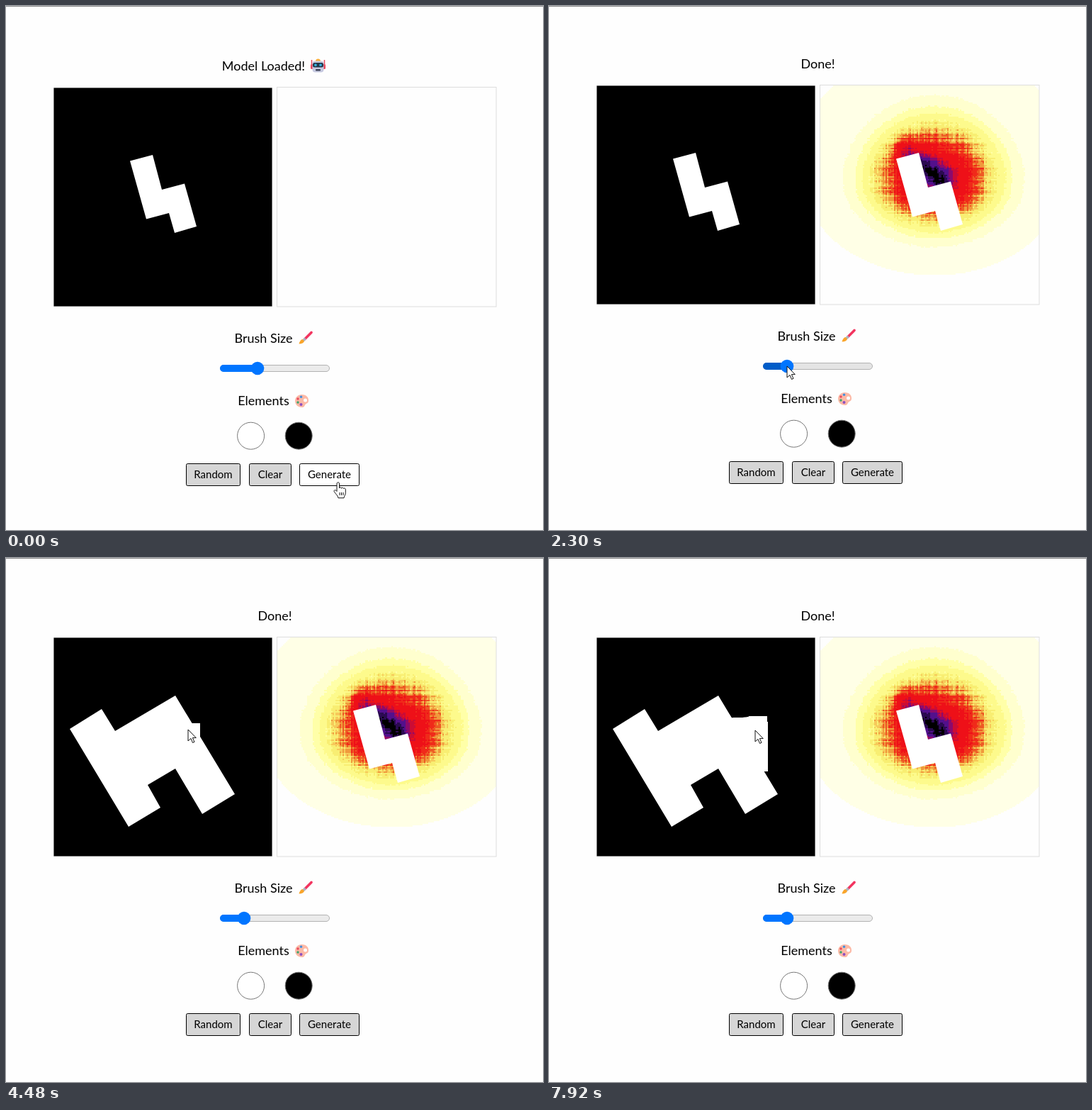
Recreate the animation shown at these times as an HTML page with a canvas. Size 758 by 739 pixels, loop 8000 ms.

```html
<!DOCTYPE html>
<html lang="en">
<head>
<meta charset="utf-8">
<title>Sketch generator</title>
<style>
  html, body { margin: 0; width: 100%; height: 100%; overflow: hidden; background: #fefefe; }
  svg { position: absolute; left: 0; top: 0; }
  text { font: 18px Lato, "Open Sans", sans-serif; text-anchor: middle; }
  .button rect { fill: #d6d6d6; stroke: #000; }
  .button text { font-size: 15px; }
  .button.hover rect { fill: #fff; }
</style>
</head>
<body>
<svg width="758" height="739" viewBox="0 0 758 739">
  <path d="M0 .5H758" stroke="#8c8c8c"/>
  <g id="page">
    <text id="title" y="88"></text>
    <g id="robot" transform="translate(430 71)">
      <path d="M1.5 2V9M19.5 2V9" stroke="#e8475c" stroke-width="1.5"/>
      <path d="M7 4a3.5 3.5 0 0 1 7 0z" fill="#fbb03b"/>
      <rect y="8" width="21" height="7" rx="1.5" fill="#e8475c"/>
      <rect x="2.5" y="3.5" width="16" height="16" rx="4" fill="#c6c9e0"/>
      <rect x="3" y="6" width="15" height="6.5" rx="2.5" fill="#26384a"/>
      <circle cx="7" cy="9.2" r="1.8" fill="#35b5e5"/>
      <circle cx="14" cy="9.2" r="1.8" fill="#35b5e5"/>
      <rect x="7" y="15" width="7" height="2.5" rx="1" fill="#3d4257"/>
    </g>

    <rect x="67" y="112" width="309" height="309" fill="#ddd"/>
    <rect x="67.5" y="112.5" width="308" height="308"/>
    <path id="sketch" fill="#fff"/>
    <path id="paint" fill="#fff"/>

    <rect x="382.5" y="111.5" width="309.500" height="309.500" fill="#fefefe"/>
    <g id="result">
      <foreignObject x="383" y="112" width="309" height="309">
        <canvas id="heat" width="155" height="155" style="display:block;width:309px;height:309px;image-rendering:pixelated"></canvas>
      </foreignObject>
      <path id="cutout" fill="#fff" transform="translate(315 0)"/>
    </g>
    <rect x="382.500" y="111.500" width="309.500" height="309.500" fill="none" stroke="#ddd"/>

    <text x="363.500" y="471.500">Brush Size</text>
    <g stroke-linecap="round">
      <path d="M431 457.500L422 466.500" stroke="#f2345f" stroke-width="3.600"/>
      <path d="M421.500 467L420 468.500" stroke="#a9b4c0" stroke-width="3.600"/>
      <path d="M413.500 473.500q2-6.500 5-6.500l2.500 2.500q-1 4-7.500 4z" fill="#f9a52b"/>
    </g>
    <rect id="track" x="302.500" y="503.500" width="154" height="9" rx="4.500" fill="#ebebeb" stroke="#b2b2b2"/>
    <rect id="filled" x="302" y="503" height="10" rx="5"/>
    <circle id="thumb" cy="508" r="9.300" fill="#0075ff"/>

    <text x="363.500" y="560">Elements</text>
    <g transform="translate(408 545)">
      <path d="M9.500 0C16 0 19.500 4 19 9c-.5 4-3 3-4.500 5s-1 4-5 4C4 18 0 14 0 9S4 0 9.500 0z" fill="#fcb9a6"/>
      <circle cx="14.500" cy="8" r="2.500" fill="#fefefe"/>
      <circle cx="4" cy="6" r="1.700" fill="#e84a5f"/>
      <circle cx="8.500" cy="3.300" r="1.700" fill="#3c8fe0"/>
      <circle cx="4" cy="11" r="1.700" fill="#3aa76d"/>
      <circle cx="8.500" cy="14" r="2" fill="#8d4fc0"/>
    </g>
    <circle cx="345.600" cy="603.200" r="19" fill="#fff" stroke="#777"/>
    <circle cx="413.200" cy="603.200" r="19" stroke="#777"/>
    <g id="buttons"></g>
  </g>
  <g id="cursor" fill="#fff" stroke="#111" stroke-linejoin="round">
    <path id="arrow" d="M0 0V16L4 12.500L6.500 18.500L9 17.400L6.400 11.600H11.300Z"/>
    <path id="hand" d="M-2 2c0-3 3.500-3 3.500 0v6c0-1.500 3-1.500 3 .3c0-1.500 3-1.300 3 .5c.3-1.300 2.800-1 2.800 1v5c0 3-2 4-2.300 7h-8c-.5-3-3-5-5.500-8.500c-1.500-2 1-3.500 2.300-2L-2 12.500zM2 14v4m2.500-4v4m2.500-4v4"/>
  </g>
</svg>
<script>
const $ = id => document.getElementById(id);
const set = (node, attrs) => Object.entries(attrs).forEach(([k, v]) => node.setAttribute(k, v));
const show = (node, on) => node.style.display = on ? "" : "none";

const LOOP = 8000, DONE = 500, DRAG = 1750, RELEASE = 2300, SHUFFLE = 2950, PAINT = 4480;
const zigzag = "M175 215.500L207 207L220 256L252 247.500L269 308L238 317L230 289L198 297.500Z";
const block = "M90 241L135 213L154 244L239 194L323 333L277 361L239 297L200 320L218 352L173 379Z";

// Each move: first step, last step, cursor positions in between.
const moves = [
  [0, 0, "469,672"],
  [1340, 2300, "450,630 390,560 325,503 325,508 328,508 331,508 334,508 336,508"],
  [2420, 3360, "350,540 425,650 385,700 311,651 311,651 280,570 200,430 158,333"],
  [3510, 4210, "178,320 200,300 225,275 245,255 260,245 263,239"],
  [4480, 5470, "257,242 253,241 260,241 269,240 279,240 288,239 292,240 292,249"],
  [5600, 6590, "292,266 292,284 283,277 275,267 265,255 275,256 283,260 285,250"],
  [6740, 7640, "275,243 262,240 250,238 260,235 270,234 281,234 290,233 291,232"],
  [7920, 7920, "291,243"]
];
const steps = moves.flatMap(([from, to, path]) => path.split(" ").map((point, i, all) => {
  const [x, y] = point.split(",").map(Number);
  const share = all.length > 1 ? i / (all.length - 1) : 0;
  return { t: Math.floor((from + (to - from) * share) / 10) * 10, x, y };
}));

const buttons = [["Random", 254.5, 76], ["Clear", 343.5, 59], ["Generate", 414.5, 84]].map(([label, x, w]) => {
  const g = document.createElementNS("http://www.w3.org/2000/svg", "g");
  g.innerHTML = `<rect x="${x}" y="642.5" width="${w}" height="31" rx="2"/><text x="${x + w / 2}" y="663">${label}</text>`;
  $("buttons").append(g);
  return { g, x, w };
});

function drawHeat() {
  const bands = [[0, "#ffffe6"], [.0, "#ffffce"], [.13, "#ffffa8"], [.21, "#fdfa8c"], [.3, "#f8ee72"],
    [.385, "#f6c95a"], [.43, "#f09a3c"], [.475, "#ee5a24"], [.52, "#f02a1a"], [.6, "#ee1018"],
    [.8, "#cc0c34"], [.9, "#8c0a6c"], [1, "#52108c"], [1.14, "#2a0a50"], [1.24, "#000"]];
  const ctx = $("heat").getContext("2d");
  const hash = n => { const s = Math.sin(n * 127.1) * 43758.5; return s - Math.floor(s) - .5; };
  for (let j = 0; j < 155; j++) for (let i = 0; i < 155; i++) {
    const x = 383 + i * 2, y = 112 + j * 2, dx = x - 544, dy = y - 245;
    const r = Math.hypot(dx / (dx < 0 ? 130 : 127), dy / (dy < 0 ? 120 : 95));
    if (r > (dy < 0 ? 1.57 : 1.42)) continue;
    // Dark ridge along the upper right edge of the figure.
    const along = Math.min(1, Math.max(0, ((x - 504) * 48 + (y - 206) * 38) / 3748));
    const ridge = Math.hypot(x - 504 - 48 * along, y - 206 - 38 * along);
    const glow = Math.exp(-((ridge / 17) ** 2)) * (.35 + .2 * along);
    const grain = r < .72 ? .1 : .02;
    const v = Math.min(.77, 1 - r) + glow + grain * (hash(i + 3) + hash(j + 201) + .5 * hash(i * 157 + j));
    let color = bands[0][1];
    for (const [level, c] of bands.slice(1)) if (v >= level) color = c;
    ctx.fillStyle = color;
    ctx.fillRect(i, j, 1, 1);
  }
}

// Square brush swept along the cursor path.
function brushPath(points) {
  let d = "";
  points.forEach((p, i) => {
    const q = points[i - 1] || p;
    const n = Math.max(1, Math.ceil(Math.hypot(p.x - q.x, p.y - q.y)));
    for (let k = 1; k <= n; k++)
      d += `M${q.x + (p.x - q.x) * k / n - 9} ${q.y + (p.y - q.y) * k / n - 9}h26v26h-26z`;
  });
  return d;
}

function render() {
  const t = performance.now() % LOOP;
  const past = steps.filter(s => s.t <= t);
  const { x, y } = past[past.length - 1];
  const done = t >= DONE, shift = done ? 0 : 3;

  set($("page"), { transform: `translate(0 ${shift})` });
  $("title").textContent = done ? "Done!" : "Model Loaded!";
  set($("title"), { x: done ? 379.5 : 363.5 });
  show($("robot"), !done);
  show($("result"), done);

  set($("sketch"), { d: t < SHUFFLE ? zigzag : block });
  set($("paint"), { d: brushPath(past.filter(s => s.t >= PAINT)) });

  const thumb = t < DRAG ? 355 : t < RELEASE ? x : 336;
  const onSlider = x > 302 && x < 457 && Math.abs(y - 508) < 9;
  set($("thumb"), { cx: thumb });
  set($("filled"), { width: thumb - 302, fill: onSlider ? "#005cc8" : "#0075ff" });
  set($("track"), { fill: onSlider ? "#e4e4e4" : "#ebebeb" });

  let onButton = false;
  for (const b of buttons) {
    const hover = x >= b.x && x <= b.x + b.w && y >= 642 + shift && y <= 674 + shift;
    b.g.setAttribute("class", hover ? "button hover" : "button");
    onButton = onButton || hover;
  }
  show($("hand"), onButton);
  show($("arrow"), !onButton);
  set($("cursor"), { transform: `translate(${x} ${y})` });
  requestAnimationFrame(render);
}

set($("cutout"), { d: zigzag });
drawHeat();
render();
</script>
</body>
</html>
```
